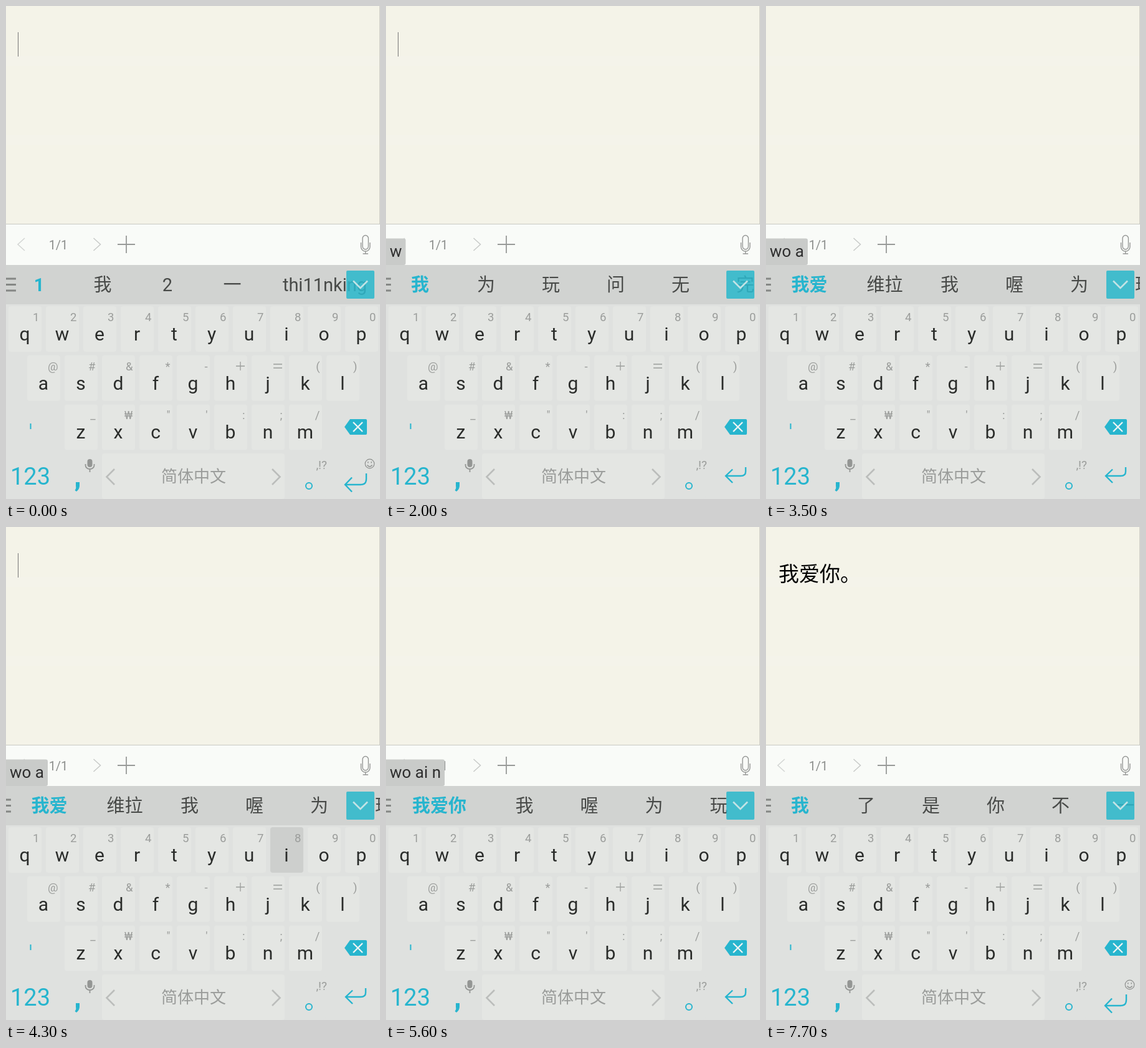
These frames come from a looping animation (600 by 790 pixels, 7800 ms). An HTML page:

```html
<!DOCTYPE html>
<html lang="zh-CN">
<head>
<meta charset="utf-8">
<style>
  html, body { margin: 0; width: 100%; height: 100%; overflow: hidden; background: #f4f3e8; }
  svg { display: block; width: 600px; height: 790px; font-family: Roboto, 'Noto Sans CJK SC', sans-serif; }
  .cjk { font-family: Roboto, 'Noto Sans CJK SC', sans-serif; }
  .line { fill: none; }
</style>
</head>
<body>
<svg id="stage" viewBox="0 0 600 790" xmlns="http://www.w3.org/2000/svg"></svg>
<script>
const LOOP = 7800, TEAL = '#27b5ce', HINT = '#9b9d9b';
const stage = document.getElementById('stage');

function add(tag, attrs, text) {
  const node = document.createElementNS('http://www.w3.org/2000/svg', tag);
  set(node, attrs);
  if (text !== undefined) node.textContent = text;
  stage.appendChild(node);
  return node;
}
function set(node, attrs) {
  for (const name in attrs) node.setAttribute(name, attrs[name]);
}
const rect = (x, y, width, height, fill, rx = 0) => add('rect', { x, y, width, height, fill, rx });
const line = (d, stroke, width) => add('path', { d, stroke, 'stroke-width': width, class: 'line' });
const label = (text, x, y, size, fill, anchor = 'middle') =>
  add('text', { x, y, 'font-size': size, fill, 'text-anchor': anchor }, text);
const show = (node, on) => node.setAttribute('visibility', on ? 'visible' : 'hidden');

// Writing area
rect(0, 0, 600, 350, '#f4f3e8');
rect(0, 80, 600, 16, '#f4f3ea');
rect(0, 207, 600, 16, '#f4f3ea');
rect(599, 0, 1, 349, '#cfcec5');
const written = label('我爱你。', 20, 87, 33, '#000', 'start');
const cursor = rect(19, 42, 1, 39, '#777');

// Toolbar
rect(0, 349, 600, 1, '#c9cac4');
rect(0, 350, 600, 65, '#f9fbf8');
line('M30 372L19 382L30 392', '#d3d5d3', 1.5);
label('1/1', 84, 390, 20, '#8e908e');
line('M140.500 372L151.500 382L140.500 392', '#c8cac8', 1.5);
line('M179 382H207M193 368V396', '#989a98', 1.8);
line('M572 372.500a4.700 5 0 0 1 9.400 0V385a4.700 5 0 0 1-9.400 0ZM569.500 379V386a7.200 7 0 0 0 14.400 0V379M576.700 393V397M572.500 397H581', '#969896', 1.4);
const bubble = rect(-4, 372.5, 0, 42.5, '#c9cbc9', 3);
const typed = label('', 6, 402, 26, '#2e2e2e', 'start');

// Candidate bar
rect(0, 415, 600, 63, '#d1d3d1');
const menu = line('', '#858785', 2.8);
const words = Array.from({ length: 6 }, (_, i) => {
  const node = label('', 0, 457, 29, i ? '#484a48' : TEAL);
  if (!i) node.setAttribute('font-weight', 700);
  return node;
});
add('rect', { x: 546, y: 424, width: 45, height: 45, rx: 2, fill: '#2cb8cc', 'fill-opacity': .86 });
line('M557 440.500L568.500 452L580 440.500', '#c3e3e5', 2.6);

// Keyboard
rect(0, 478, 600, 312, '#dfe1df');
const keys = {};
function key(name, x, y, width = 53, height = 73) {
  keys[name] = rect(x, y, width, height, '#e4e6e3', 4);
}
const rows = [
  ['qwertyuiop', '1234567890', 30],
  ['asdfghjkl', '@#&*-  ()', 60],
  ['zxcvbnm', '_₩"\':;/', 120]
];
rows.forEach(([letters, hints, first], row) => {
  const top = 481 + row * 78.7;
  [...letters].forEach((letter, i) => {
    const center = first + i * 60;
    key(letter, center - 26, top);
    label(letter, center, top + 55, 30, '#2a2c2a');
    label(hints[i], center + 23.5, top + 24, 18.5, HINT, 'end');
  });
});
line('M369 577H383M376 570V584M429 574H443M429 580H443', HINT, 1.3);

line('M39.500 669V678', TEAL, 2);
add('path', { d: 'M543 674.500L552 662H577Q579 662 579 664V685Q579 687 577 687H552Z', fill: TEAL });
line('M557 667L572 682M572 667L557 682', '#edf5f4', 2.3);

label('123', 39, 767, 38, TEAL);
add('path', { d: 'M112 763H118V769Q118 774 113 778L110.500 776Q113 773 112 769Z', fill: TEAL });
rect(130.5, 726, 8, 13, '#949694', 4);
line('M127.500 734V736a7 6 0 0 0 14 0V734M134.500 742V747', '#949694', 1.8);

key('space', 154, 717);
keys.space.setAttribute('width', 293);
line('M174 742L161.500 754.500L174 767', '#bbbdbb', 2.6);
line('M427 742L439.500 754.500L427 767', '#bbbdbb', 2.6);
label('简体中文', 301, 763, 26, '#9a9c9a');

key('。', 460, 717);
keys['。'].setAttribute('fill', '#dfe1df');
add('circle', { cx: 486, cy: 769, r: 5, stroke: TEAL, 'stroke-width': 2, class: 'line' });
label(',!?', 515, 742, 19, HINT, 'end');

const enter = line('M577 739V746Q577 753 569 753H545M556 742.500L545 753L556 764', TEAL, 2.4);
const smiley = [
  add('circle', { cx: 583.5, cy: 733.5, r: 7.3, stroke: '#8e908e', 'stroke-width': 1.2, class: 'line' }),
  line('M579.500 735.500Q583.500 741 587.500 735.500M580.800 730V732.500M586.200 730V732.500', '#8e908e', 1.3)
];

// Each step: press time, key, composed text, candidates, centers of the first two
const steps = [
  [-100, '', '', '1 我 2 一 thi11nking', 53, 155],
  [800, 'w', 'w', '我 为 玩 问 无 完', 54.5, 160.5],
  [2100, 'o', 'wo', '我 喔 为 玩 问 无', 54.5, 160.5],
  [3100, 'a', 'wo a', '我爱 维拉 我 喔 为 玩', 69.5, 190.5],
  [4300, 'i', 'wo ai', '我爱 我 喔 为 玩', 69.5, 189.5],
  [5300, 'n', 'wo ai n', '我爱你 我 喔 为 玩', 85.5, 222],
  [6100, 'i', 'wo ai ni', '我爱你 我 喔 为 玩', 85.5, 222],
  [7000, '。', '', '我 了 是 你 不 一', 54.5, 160.5]
];
const COMMIT = 7100;
let current = null;

function compose(step) {
  current = step;
  const [, , text, list, first, second] = step;
  const entries = list.split(' ');
  words.forEach((node, i) => {
    const word = entries[i] || '';
    const wide = word.length > 4 ? 44.5 : 0;
    node.textContent = word;
    node.setAttribute('x', i ? second + (i - 1) * 104 + wide : first);
  });
  const idle = !text;
  typed.textContent = text;
  bubble.setAttribute('width', idle ? 0 : typed.getComputedTextLength() + 16);
  show(bubble, !idle);
  const bar = step === steps[0] ? 16 : 8;
  menu.setAttribute('d', [437, 446.5, 456].map(y => `M0 ${y}H${bar}`).join(''));
  smiley.forEach(node => show(node, idle));
  enter.setAttribute('d', idle
    ? 'M578 749V758Q578 767 569 767H544M555 755.500L544 767L555 778.500'
    : 'M577 739V746Q577 753 569 753H545M556 742.500L545 753L556 764');
}

function draw(t) {
  const step = steps.filter(s => t >= s[0] + 100).pop();
  if (step !== current) compose(step);

  for (const name in keys) keys[name].setAttribute('fill', name === '。' ? '#dfe1df' : '#e4e6e3');
  const pressed = steps.find(s => s[1] && t >= s[0] && t < s[0] + 200);
  if (pressed) keys[pressed[1]].setAttribute('fill', '#cdcfcd');

  const done = t >= COMMIT;
  show(written, done);
  set(cursor, done ? { x: 151, y: 56 } : { x: 19, y: 42 });
  show(cursor, (done ? t - COMMIT : t) % 1000 < 500);
}

const start = performance.now();
function tick() {
  draw((performance.now() - start) % LOOP);
  requestAnimationFrame(tick);
}
tick();
</script>
</body>
</html>
```
